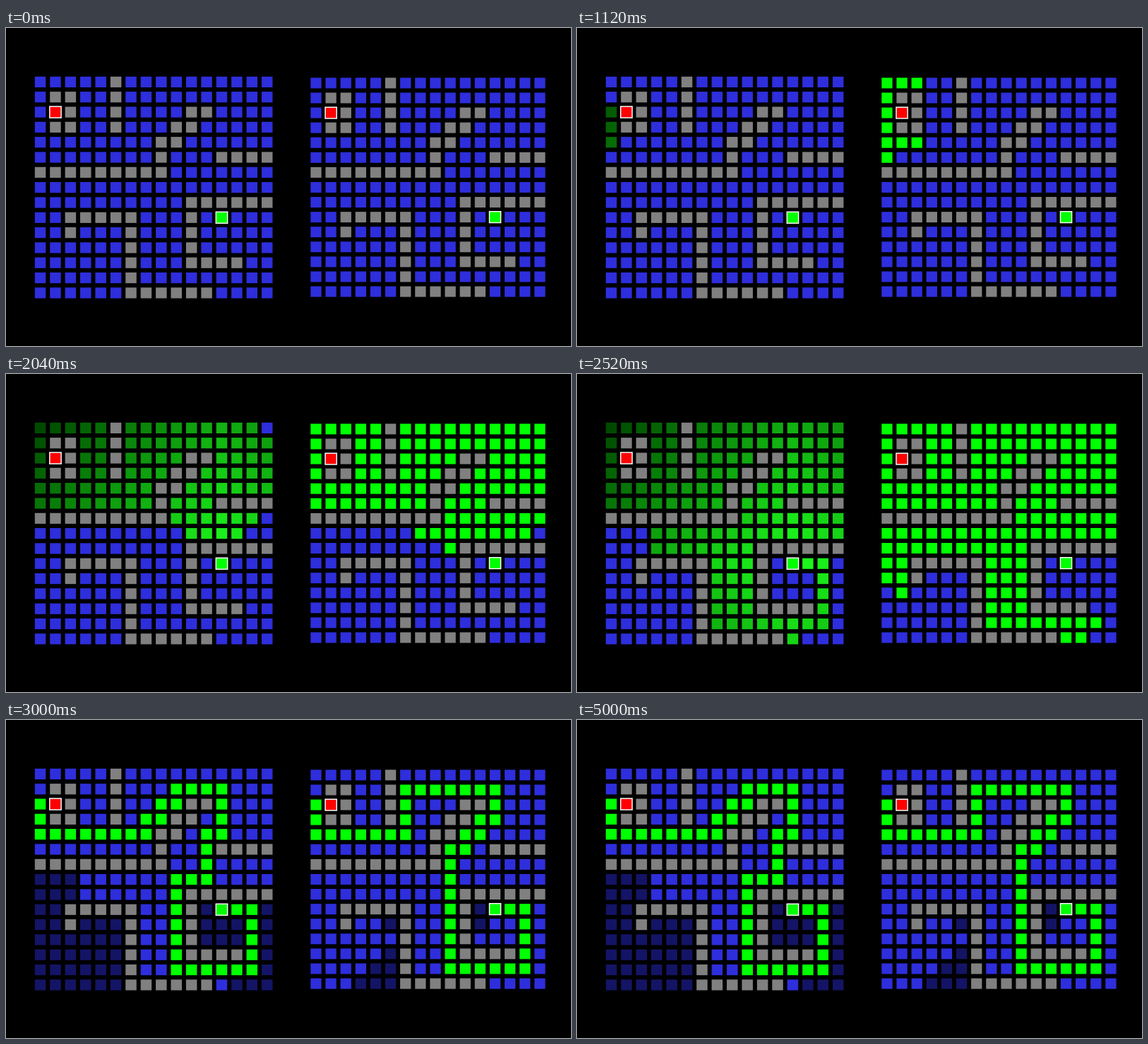
Recreate the animation shown at these times as a matplotlib script. Size 800 px wide and 450 px high, loop 5.6 s.

```python
import numpy as np
import matplotlib.pyplot as plt
from matplotlib.animation import FuncAnimation
from matplotlib.collections import PatchCollection
from matplotlib.patches import Rectangle

WIDTH, HEIGHT, DPI = 800, 450, 100
INTERVAL, FRAMES = 40, 140

ROWS, COLS = 15, 16
START, GOAL = (2, 1), (9, 12)

# Each wall is a line through its corners, given as (row, column).
WALL_LINES = [
    [(0, 5), (3, 5)],
    [(1, 1), (1, 2), (3, 2), (3, 1)],
    [(2, 11), (2, 10), (3, 10), (3, 9), (4, 9), (4, 8), (6, 8), (6, 0)],
    [(5, 12), (5, 15)],
    [(8, 15), (8, 10), (12, 10), (12, 13)],
    [(10, 2), (9, 2), (9, 6), (14, 6), (14, 11)],
]

WALL = (0.5, 0.5, 0.5)
FREE = (46 / 255, 46 / 255, 220 / 255)
UNSEEN = (20 / 255, 20 / 255, 102 / 255)
GREEN = (0, 1, 0)
RED = (1, 0, 0)


def trace(corners):
    return {(r, c)
            for (r0, c0), (r1, c1) in zip(corners, corners[1:])
            for r in range(min(r0, r1), max(r0, r1) + 1)
            for c in range(min(c0, c1), max(c0, c1) + 1)}


WALLS = set().union(*map(trace, WALL_LINES))
CELLS = [(r, c) for r in range(ROWS) for c in range(COLS)]
OPEN = set(CELLS) - WALLS


def neighbours(cell):
    r, c = cell
    around = [(r - 1, c), (r, c - 1), (r, c + 1), (r + 1, c)]
    return [p for p in around if p in OPEN]


def to_goal(cell):
    return abs(cell[0] - GOAL[0]) + abs(cell[1] - GOAL[1])


def breadth_first():
    """Distances and parents of all cells, in order of discovery."""
    dist, parent = {START: 0}, {}
    queue = [START]
    for cell in queue:
        for nxt in neighbours(cell):
            if nxt not in dist:
                dist[nxt] = dist[cell] + 1
                parent[nxt] = cell
                queue.append(nxt)
    return dist, parent


def a_star(dist):
    """Cells in order of expansion, ties going to the upper row."""
    frontier, order, parent = {START}, [], {}
    while True:
        cell = min(frontier, key=lambda p: (dist[p] + to_goal(p), p))
        if cell == GOAL:
            return order[1:], parent
        frontier.remove(cell)
        order.append(cell)
        for nxt in neighbours(cell):
            if nxt != START and nxt not in parent:
                parent[nxt] = cell
                frontier.add(nxt)


def route_to_goal(parent):
    route, cell = set(), GOAL
    while cell != START:
        route.add(cell)
        cell = parent[cell]
    return route


def shade_by_nearness(cell):
    h = to_goal(cell)
    tint = max(0, 21 - h) * 1.4 / 255
    return tint, (255 - 8.6 * h) / 255, tint


class Board:
    def __init__(self, ax, origin, pitch, size, order, parent, shade):
        self.order, self.shade = order, shade
        self.route = route_to_goal(parent)
        w, h = size

        def square(cell, grow=0, **style):
            x = origin[0] + cell[1] * pitch[0] - grow
            y = origin[1] + cell[0] * pitch[1] - grow
            return Rectangle((x, y), w + 2 * grow, h + 2 * grow,
                             snap=False, **style)

        self.tiles = PatchCollection([square(cell) for cell in CELLS],
                                     linewidths=0, antialiased=True)
        self.tiles.set_snap(False)
        ax.add_collection(self.tiles)
        for cell in (START, GOAL):
            ax.add_patch(square(cell, 0.4, fill=False, edgecolor="white",
                                linewidth=1.5 * 72 / DPI))

    def paint(self, count):
        done = count > len(self.order)
        seen = set(self.order[:max(0, count)])

        def colour(cell):
            if cell == START:
                return RED
            if cell == GOAL or (done and cell in self.route):
                return GREEN
            if cell in WALLS:
                return WALL
            if cell in seen:
                return FREE if done else self.shade(cell)
            return UNSEEN if done else FREE

        self.tiles.set_facecolor([colour(cell) for cell in CELLS])


fig = plt.figure(figsize=(WIDTH / DPI, HEIGHT / DPI), dpi=DPI,
                 facecolor="black")
ax = fig.add_axes([0, 0, 1, 1])
ax.set_xlim(0, WIDTH)
ax.set_ylim(HEIGHT, 0)
ax.axis("off")

distance, bfs_parent = breadth_first()
bfs_order = [p for p, d in distance.items() if 0 < d < distance[GOAL]]
astar_order, astar_parent = a_star(distance)

left = Board(ax, (40.8, 68.8), (21.41, 21.32), (15.5, 15.2),
             astar_order, astar_parent, shade_by_nearness)
right = Board(ax, (431.3, 70.4), (21.13, 21.08), (15.3, 15.0),
              bfs_order, bfs_parent, lambda cell: GREEN)


def update(frame):
    t = frame * INTERVAL
    steps = int(np.interp(t, [1005, 2040, 3000], [0, 91, 179]) + 1e-6)
    # The left search starts seven steps after the right one.
    left.paint(steps - 7)
    right.paint(steps)
    return left.tiles, right.tiles


anim = FuncAnimation(fig, update, frames=FRAMES, interval=INTERVAL,
                     repeat=True, repeat_delay=0, blit=False)
plt.show()
```
